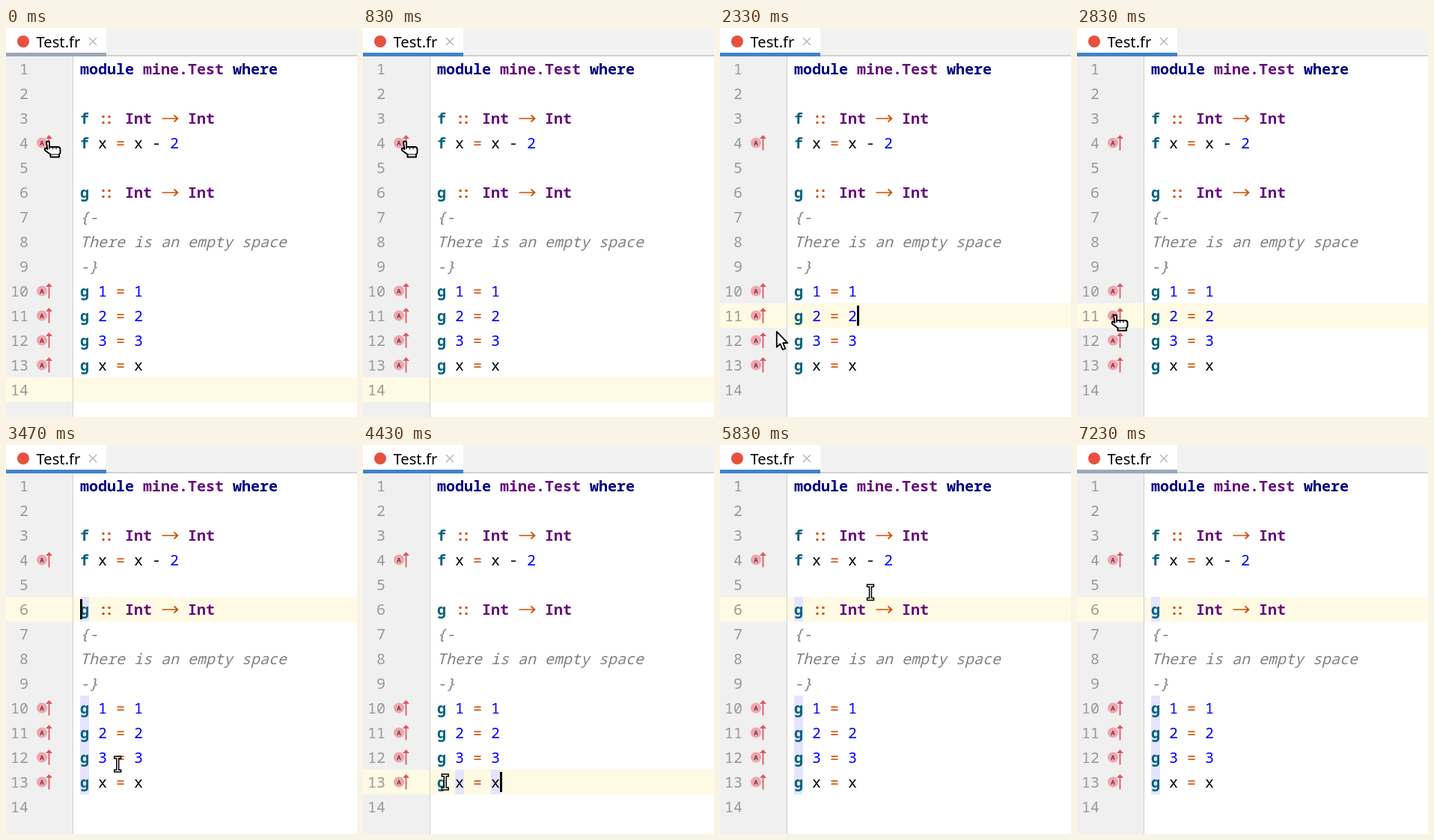
Recreate the animation shown at these times as an HTML page. Size 469x520 px, loop 7260 ms.

```html
<!DOCTYPE html>
<html lang="en">
<head>
<meta charset="utf-8">
<title>Code editor</title>
<style>
  html, body { margin: 0; width: 100%; height: 100%; overflow: hidden; background: #fff; }
  svg { display: block; width: 469px; height: 520px; }
  text { font: 20px "Noto Sans Mono", "DejaVu Sans Mono", monospace; }
  .tab { font: 20.2px "Noto Sans", "Open Sans", sans-serif; }
  .number { fill: #999; }
  .keyword { fill: #000080; font-weight: bold; }
  .type { fill: #660e7a; font-weight: bold; }
  .func { fill: #00627a; font-weight: bold; }
  .op { fill: #d05000; }
  .literal { fill: #00f; }
  .comment { fill: #808080; font-style: italic; }
  .badge { font-size: 9px; font-weight: bold; fill: #6b3038; text-anchor: middle; }
</style>
</head>
<body>
<svg viewBox="0 0 469 520">
  <rect width="469" height="520" fill="#fff"/>
  <rect width="469" height="38" fill="#f2f2f2"/>
  <rect y="36" width="469" height="2" fill="#d1d1d1"/>
  <rect width="134" height="38" fill="#fff"/>
  <rect id="underline" y="33" width="134" height="5"/>
  <circle cx="23" cy="18" r="8" fill="#e8503f"/>
  <text class="tab" x="40.5" y="26">Test.fr</text>
  <path d="M111 13l10 10m0-10l-10 10" stroke="#b3b3b3" stroke-width="1.4"/>
  <rect y="38" width="89" height="482" fill="#f0f0f0"/>
  <rect id="activeRow" width="469" height="33" fill="#fffae3"/>
  <rect x="89" y="38" width="1" height="482" fill="#d0d0d0"/>
  <g id="marks" fill="#e4e4ff"></g>
  <g id="code"></g>
  <rect id="caret" width="3" height="27"/>
  <g id="cursor">
    <g id="hand" stroke="#000" stroke-linejoin="round">
      <path d="M-3 2Q-3 0.500-1 0.500Q1 0.500 1 2.500V8H12Q15.500 8 15.500 11V16L14 18V21.500H2.500V18L-5 12.500Q-6 9.500-3.500 9.500L-1.500 11Z"
        fill="#fff" stroke-width="1.9"/>
      <path d="M1 8v3M5.500 8v3M10 8v3M2.500 18H14" stroke-width="1.2"/>
    </g>
    <path id="arrow" d="M1 1V21.500L5.700 17.300L9 25L12.500 23.500L9.300 16H15.500Z" fill="#fff" stroke="#000" stroke-width="1.8" stroke-linejoin="round"/>
    <g id="beam" fill="none" stroke-linecap="square">
      <path d="M-3 -9H3M0 -9V9M-3 9H3" stroke="#000" stroke-width="4.4"/>
      <path d="M-3 -9H3M0 -9V9M-3 9H3" stroke="#fff" stroke-width="1.4"/>
    </g>
  </g>
</svg>
<script>
const LOOP = 7260, LEFT = 99, CELL = 12, ROW = 33;
const $ = id => document.getElementById(id);
const rowTop = row => 38 + ROW * (row - 1);
const colX = col => LEFT + CELL * col;

function add(parent, tag, attrs, text) {
  const el = document.createElementNS("http://www.w3.org/2000/svg", tag);
  for (const key in attrs) el.setAttribute(key, attrs[key]);
  if (text) el.textContent = text;
  return parent.appendChild(el);
}

// Each line is a list of [column, style, text].
const signature = name => [[0, "func", name], [2, "op", "::"], [5, "type", "Int"], [9, "op", "->"], [12, "type", "Int"]];
const clause = (arg, result) => [[0, "func", "g"], [2, ...arg], [4, "op", "="], [6, ...result]];
const num = n => ["literal", n];
const x = ["name", "x"];
const lines = [
  [[0, "keyword", "module"], [7, "type", "mine.Test"], [17, "keyword", "where"]],
  [],
  signature("f"),
  [[0, "func", "f"], [2, ...x], [4, "op", "="], [6, ...x], [8, "name", "-"], [10, "literal", "2"]],
  [],
  signature("g"),
  [[0, "comment", "{-"]],
  [[0, "comment", "There is an empty space"]],
  [[0, "comment", "-}"]],
  clause(num("1"), num("1")),
  clause(num("2"), num("2")),
  clause(num("3"), num("3")),
  clause(x, x),
  []
];
const iconRows = [4, 10, 11, 12, 13];

// The two operators below are joined glyphs, so they are drawn as shapes.
const ligatures = {
  "::": { d: "M5.500 13h3v3h-3zM13.500 13h3v3h-3zM5.500 21h3v3h-3zM13.500 21h3v3h-3z", fill: "#d05000" },
  "->": { d: "M1.500 17H22.500M17.500 12.500L22.500 17L17.500 21.500", fill: "none", stroke: "#d05000", "stroke-width": 1.7 }
};

lines.forEach((tokens, i) => {
  const top = rowTop(i + 1), code = $("code");
  add(code, "text", { class: "number", x: 30, y: top + 24, "text-anchor": "end" }, String(i + 1));
  for (const [col, style, text] of tokens) {
    const shape = ligatures[text];
    if (shape) add(code, "path", { ...shape, transform: `translate(${colX(col)} ${top})` });
    else add(code, "text", { class: style, x: colX(col), y: top + 24 }, text);
  }
  if (iconRows.includes(i + 1)) {
    const icon = add(code, "g", { transform: `translate(0 ${top})` });
    add(icon, "circle", { cx: 48, cy: 16.5, r: 7, fill: "#f0a5ad" });
    add(icon, "text", { class: "badge", x: 48, y: 19.8 }, "A");
    add(icon, "path", { d: "M57.500 26.500V9", stroke: "#db5860", "stroke-width": 1.8 });
    add(icon, "path", { d: "M53 11L57.500 6L62 11Z", fill: "#db5860" });
  }
});

const gMarks = [6, 10, 11, 12, 13].map(row => [row, 0]);
const states = [
  { at: 0, row: 14, col: 0, marks: [] },
  { at: 1000, row: 3, col: 0, marks: [[3, 0], [4, 0]] },
  { at: 1970, row: 11, col: 7, marks: [] },
  { at: 2930, row: 6, col: 0, marks: gMarks },
  { at: 3900, row: 13, col: 7, marks: [] },
  { at: 4030, row: 13, col: 7, marks: [[13, 2], [13, 6]] },
  { at: 5070, row: 6, col: 0, marks: gMarks }
];
const caretOn = [[330, 830], [1000, 1560], [1970, 2530], [2930, 3560], [3900, 4560], [5070, 5830], [6330, 6830]];
const cursorOn = [[0, 30], [230, 6630]];
const focused = [[330, 7230]];

// Pointer strokes as [time, x, y]; it rests between them.
const strokes = [
  [[0, 57, 151], [30, 57, 151]],
  [[230, -17, 205], [830, 57, 151]],
  [[1270, 57, 151], [1470, 123, 224], [1830, 192.5, 389]],
  [[2170, 192.5, 389], [2330, 75, 405], [2830, 52, 383]],
  [[3170, 52, 383], [3470, 149, 426.5], [3870, 194.5, 449]],
  [[4230, 194.5, 449], [4430, 110, 450.5], [4830, 46, 456]],
  [[5530, 46, 456], [5830, 201, 197]],
  [[6070, 201, 197], [6630, 0, -27]]
];

const within = (spans, t) => spans.some(([from, to]) => t >= from && t < to);
const lastBefore = (list, t, start) => list.filter(item => start(item) <= t).pop();

// Cubic through the points, at rest at both ends of the stroke.
function pointerAt(t) {
  const pts = lastBefore(strokes, t, s => s[0][0]);
  const end = pts[pts.length - 1];
  if (t >= end[0]) return [end[1], end[2]];
  const i = pts.findIndex((p, k) => t < pts[k + 1][0]);
  const a = pts[i], b = pts[i + 1], span = b[0] - a[0], u = (t - a[0]) / span;
  const slope = (k, axis) => k === 0 || k === pts.length - 1 ? 0
    : (pts[k + 1][axis] - pts[k - 1][axis]) / (pts[k + 1][0] - pts[k - 1][0]);
  return [1, 2].map(axis => {
    const ease = u * u * (3 - 2 * u);
    return a[axis] + (b[axis] - a[axis]) * ease
      + span * u * (1 - u) * ((1 - u) * slope(i, axis) - u * slope(i + 1, axis));
  });
}

function pointerKind(px, py) {
  const row = Math.floor((py - 38) / ROW) + 1;
  if (py < 38) return "arrow";
  if (px >= 90) return "beam";
  return px >= 40 && px < 64 && iconRows.includes(row) ? "hand" : "arrow";
}

const show = (el, on) => el.style.display = on ? "" : "none";
let shown;

function draw() {
  const t = performance.now() % LOOP;
  const state = lastBefore(states, t, s => s.at);
  if (state !== shown) {
    shown = state;
    $("activeRow").setAttribute("y", rowTop(state.row));
    $("caret").setAttribute("x", colX(state.col));
    $("caret").setAttribute("y", rowTop(state.row) + 3);
    $("marks").replaceChildren();
    for (const [row, col] of state.marks)
      add($("marks"), "rect", { x: colX(col), y: rowTop(row), width: CELL, height: ROW });
  }
  show($("caret"), within(caretOn, t));
  $("underline").setAttribute("fill", within(focused, t) ? "#4083c9" : "#9ca7b8");

  const [px, py] = pointerAt(t), kind = pointerKind(px, py);
  show($("cursor"), within(cursorOn, t));
  $("cursor").setAttribute("transform", `translate(${px} ${py})`);
  for (const id of ["hand", "arrow", "beam"]) show($(id), id === kind);
  requestAnimationFrame(draw);
}
draw();
</script>
</body>
</html>
```
